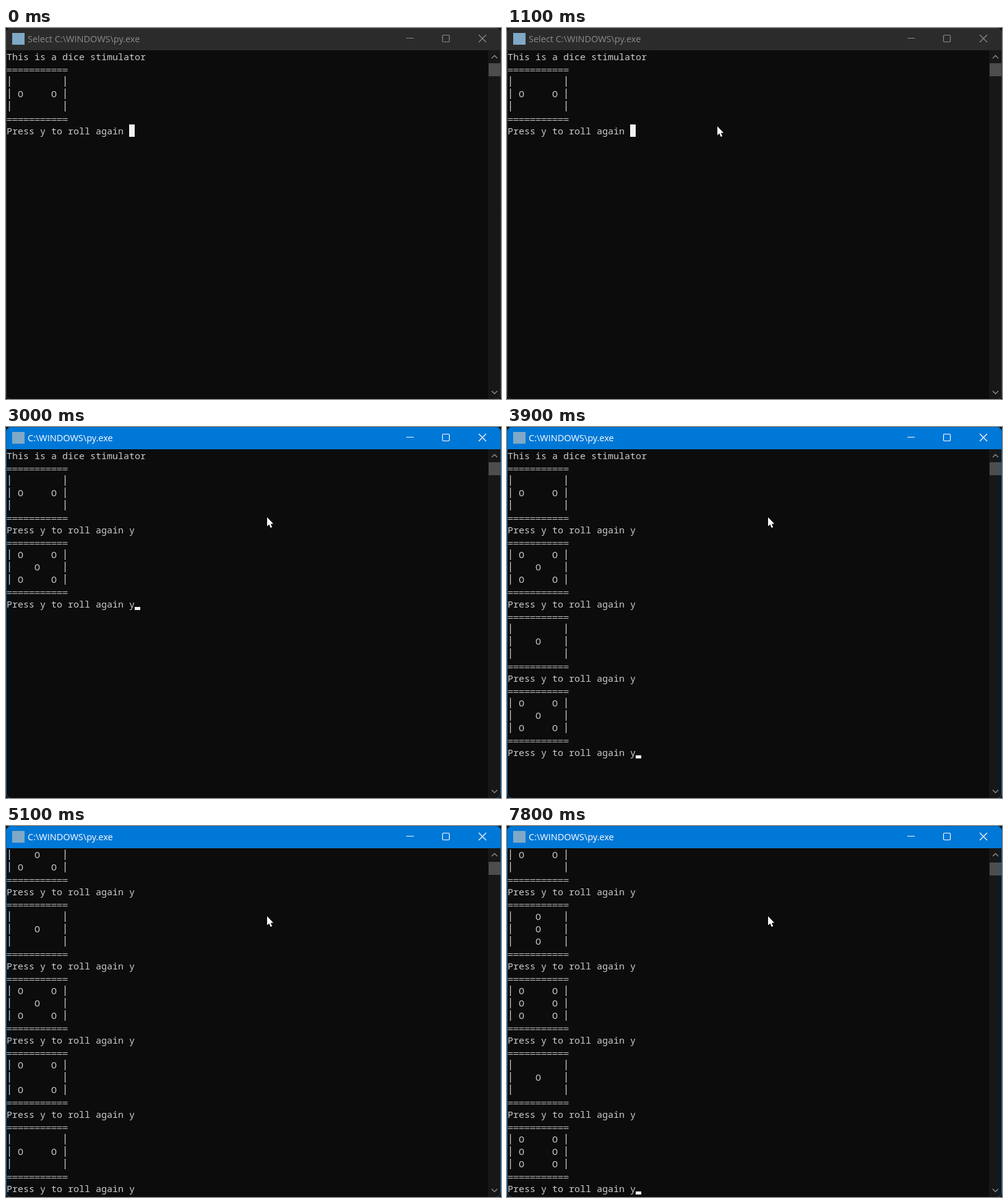
These frames come from a looping animation (800x600 px, 8 s). An HTML page with a canvas:

```html
<!DOCTYPE html>
<html lang="en">
<head>
<meta charset="utf-8">
<title>Dice in a console</title>
<style>
  html, body { margin: 0; width: 100%; height: 100%; overflow: hidden; background: #0c0c0c; }
  canvas { display: block; }
</style>
</head>
<body>
<canvas id="stage" width="800" height="600"></canvas>
<script>
const ctx = document.getElementById('stage').getContext('2d');
const LOOP = 8000, CELL = 9, LINE = 20, TOP = 36, VISIBLE = 28;

const FACES = [2, 5, 1, 5, 4, 2, 3, 6, 1, 6];
const TYPED = [2400, 3000, 3400, 3900, 4400, 5100, 5600, 6300, 7000, 7800];
const ROLLED = [2500, 3100, 3500, 4100, 4500, 5200, 5700, 6400, 7200];
const CARET_OFF = [[5100, 5200], [5600, 5700], [7200, 7300]];
const FOCUS = 1300, DESELECT = 2300;

const NONE = '|         |', MID = '|    O    |', PAIR = '| O     O |';
const DICE = {
  1: [NONE, MID, NONE], 2: [NONE, PAIR, NONE], 3: [MID, MID, MID],
  4: [PAIR, NONE, PAIR], 5: [PAIR, MID, PAIR], 6: [PAIR, PAIR, PAIR]
};
const EDGE = '='.repeat(11), PROMPT = 'Press y to roll again ';

const within = (t, a, b) => t >= a && t < b;
const passed = (times, t) => times.filter(at => t >= at).length;

function rect(x, y, w, h, color) {
  ctx.fillStyle = color;
  ctx.fillRect(x, y, w, h);
}

function line(points, color, width) {
  ctx.beginPath();
  points.forEach(([x, y]) => ctx.lineTo(x, y));
  ctx.strokeStyle = color;
  ctx.lineWidth = width;
  ctx.stroke();
}

function titleBar(t) {
  const active = t >= FOCUS, ink = active ? '#fff' : '#8c8c8c';
  rect(0, 0, 800, TOP, active ? '#0078d7' : '#2b2b2b');
  rect(10, 8, 20, 19, '#7fa9c6');
  ctx.font = '14.5px "Open Sans", "Noto Sans", sans-serif';
  ctx.fillStyle = ink;
  ctx.fillText((t < DESELECT ? 'Select ' : '') + 'C:\\WINDOWS\\py.exe', 35, 23);
  line([[647, 16.5], [659, 16.5]], ink, 1);
  ctx.lineWidth = 1.2;
  ctx.beginPath();
  ctx.roundRect(705.5, 11.5, 11, 11, 1.5);
  ctx.stroke();
  line([[764, 11], [776, 23]], ink, 1.2);
  line([[776, 11], [764, 23]], ink, 1.2);
}

function scrollBar(top) {
  rect(779, TOP, 21, 564, '#171717');
  rect(780, 57 + Math.round(top / 18), 19, 21, '#4d4d4d');
  line([[785, 49], [789.5, 44.5], [794, 49]], '#8a8a8a', 1.5);
  line([[785, 587], [789.5, 591.5], [794, 587]], '#8a8a8a', 1.5);
}

function textRow(text, row) {
  const y = TOP + row * LINE;
  [...text].forEach((c, i) => {
    const x = 1 + i * CELL;
    if (c === '|') ctx.fillRect(x + 3.9, y + 2, 1.3, 17);
    else if (c === '=') {
      ctx.fillRect(x + .5, y + 10, 8, 1);
      ctx.fillRect(x + .5, y + 13, 8, 1);
    } else if (c !== ' ') ctx.fillText(c, x, y + 16);
  });
}

function consoleText(t) {
  const rolls = 1 + passed(ROLLED, t), answers = passed(TYPED, t);
  const lines = ['This is a dice stimulator'];
  for (let i = 0; i < rolls; i++)
    lines.push(EDGE, ...DICE[FACES[i]], EDGE, PROMPT + (i < answers ? 'y' : ''));
  const top = Math.max(0, lines.length - VISIBLE), shown = lines.slice(top);
  ctx.font = '15px "Noto Sans Mono", "DejaVu Sans Mono", monospace';
  ctx.fillStyle = '#ccc';
  shown.forEach(textRow);

  const x = 1 + shown.at(-1).length * CELL, y = TOP + (shown.length - 1) * LINE;
  if (t < DESELECT) {
    // selected cell; the blinking caret inverts its lower quarter
    rect(x, y, CELL, within(t, 1700, 2200) ? 15 : LINE, '#f2f2f2');
  } else if (!CARET_OFF.some(([a, b]) => within(t, a, b))) {
    rect(x, y + 15, CELL, 5, '#f2f2f2');
  }
  scrollBar(top);
}

function frameEdge(t) {
  const shape = new Path2D();
  shape.roundRect(0, 0, 800, 601, 8);
  const outside = new Path2D(shape);
  outside.rect(0, 0, 800, 601);
  ctx.fillStyle = '#0c0c0c';
  ctx.fill(outside, 'evenodd');
  const border = new Path2D();
  border.roundRect(.5, .5, 799, 600, 8);
  ctx.strokeStyle = t >= FOCUS ? '#0067b8' : '#383838';
  ctx.lineWidth = 1;
  ctx.stroke(border);
}

function pointer(t) {
  if (t < 500 || within(t, 1300, 1400)) return;
  const mix = (a, b, k) => a + (b - a) * Math.min(1, k);
  const early = t < 1000, k = early ? (t - 500) / 500 : (t - 1000) / 200;
  const x = Math.round(early ? mix(0, 257, k) : mix(257, 422, k));
  const y = Math.round(early ? mix(210, 171, k) : mix(171, 146, k));
  ctx.save();
  ctx.translate(x, y);
  ctx.fillStyle = '#fff';
  ctx.fill(new Path2D('M0 0V14.5L3.3 11.5L5.6 17L8 16L5.8 10.7L10 10.4Z'));
  ctx.restore();
}

function draw(now) {
  const t = Math.floor(now % LOOP / 100) * 100;
  rect(0, 0, 800, 600, '#0c0c0c');
  titleBar(t);
  consoleText(t);
  frameEdge(t);
  pointer(t);
  requestAnimationFrame(draw);
}
draw(0);
</script>
</body>
</html>
```
